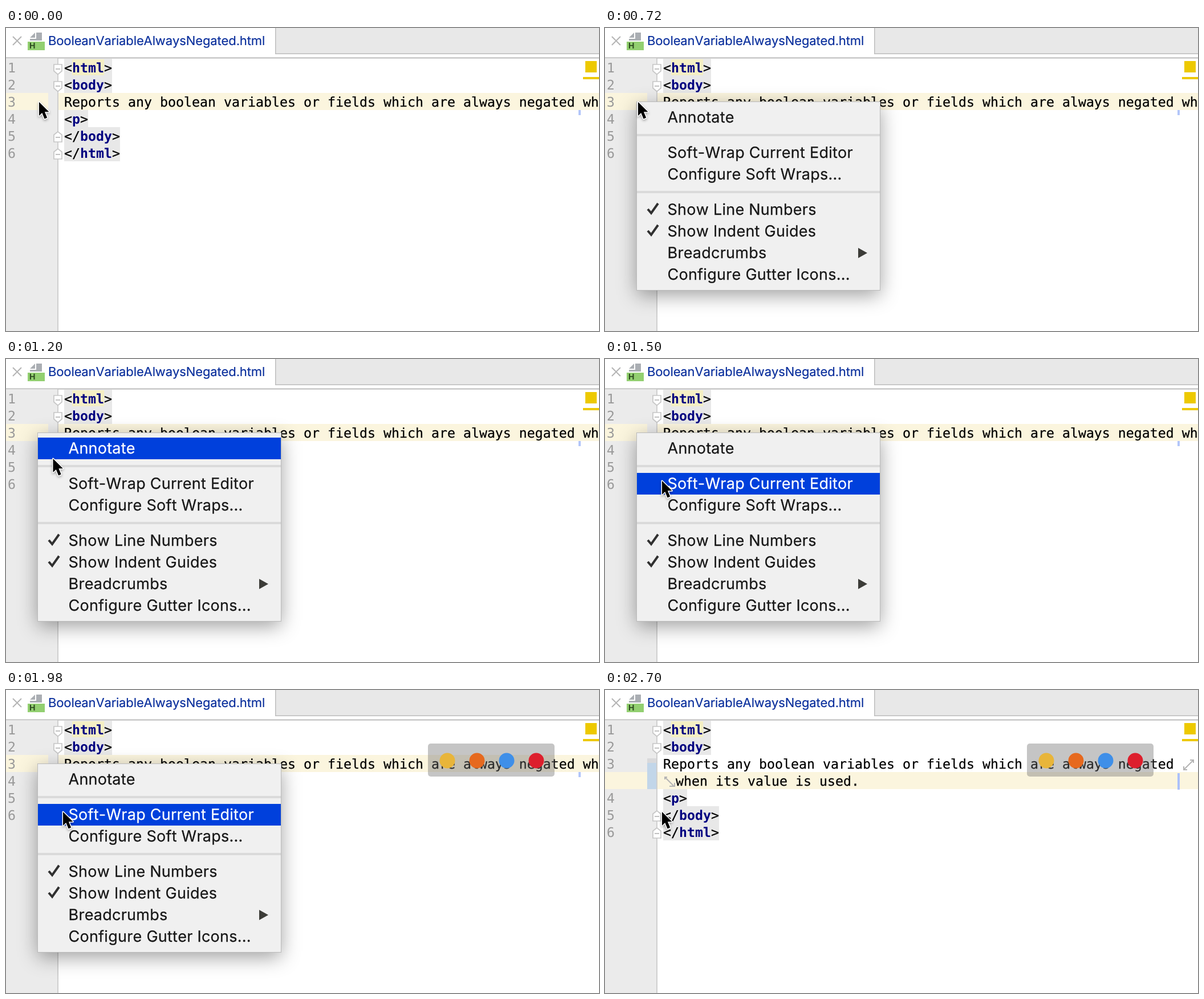
Write an HTML page that moves like this. It is 1040 px wide and 532 px high and loops after 2760 ms.

```html
<!DOCTYPE html>
<html lang="en">
<head>
<meta charset="utf-8">
<title>Soft wrap demo</title>
<style>
  html, body { margin: 0; width: 100%; height: 100%; overflow: hidden; background: #fff; }
  svg { display: block; width: 1040px; height: 532px; }
  text { white-space: pre; text-rendering: geometricPrecision; }
  .code { font: 23.25px "DejaVu Sans Mono", monospace; fill: #000; stroke: #000; stroke-width: .25; }
  .code .tag { font-weight: bold; fill: #000080; stroke: none; }
  .num { font: 23.25px "DejaVu Sans Mono", monospace; fill: #999; }
  .tab { font: 22px Inter, sans-serif; font-kerning: none; letter-spacing: -.12px;
    fill: #0a2f9c; stroke: #0a2f9c; stroke-width: .2; }
  .item { font: 27px Inter, sans-serif; font-kerning: none; letter-spacing: .25px;
    fill: #161616; stroke: #161616; stroke-width: .25; }
  .item.on { fill: #fff; stroke: #fff; }
  .line { fill: none; stroke: #b4b4b4; stroke-width: 2; }
  .shade { filter: drop-shadow(0 9px 17px rgba(0, 0, 0, .38)); }
  .arrow { filter: drop-shadow(0 2px 2px rgba(0, 0, 0, .3)); }
</style>
</head>
<body>
<svg id="stage" viewBox="0 0 1040 532"></svg>
<script>
const LOOP = 2760, STEP = 60;
const MENU_IN = 240, WRAP = 2040, POPUP_IN = 1560, POPUP_FADE = 240, CARET_OFF = 2520;
const GREY = '#e8e8e8', CREAM = '#fbf5de', GUTTER = '#ebebeb', YELLOW = '#edc900';
const CHAR = 14, LEFT = 102, ROW = 30, TOP = 54;

// time, x, y of the pointer tip
const PATH = [
  [0, 57, 129], [900, 57, 129], [960, 59, 131], [1020, 61.5, 134], [1140, 74, 157],
  [1260, 89, 191], [1380, 98, 210], [1440, 99, 213], [LOOP, 99, 213]
];

const rowY = row => TOP + row * ROW;
const rect = (x, y, w, h, fill, more = '') =>
  `<rect x="${x}" y="${y}" width="${w}" height="${h}" fill="${fill}" ${more}/>`;
const text = (cls, x, y, str) => `<text class="${cls}" x="${x}" y="${y}">${str}</text>`;
const path = (d, more = 'class="line"') => `<path d="${d}" ${more}/>`;
const group = (id, body) => `<g id="${id}">${body}</g>`;

const code = (row, str, x = LEFT) => text('code', x, rowY(row) + 24, str);
const num = (row, n) => text('num', 3, rowY(row) + 24, n);

function tag(row, name, open = '&lt;', lit = false) {
  const lead = open === '&lt;' ? 1 : 2;
  const width = (name.length + lead + 1) * CHAR;
  return rect(LEFT, rowY(row), width, ROW, GREY) +
    (lit ? rect(LEFT + lead * CHAR, rowY(row) + 1, name.length * CHAR, 28, '#f5efc4') : '') +
    code(row, `${open}<tspan class="tag">${name}</tspan>&gt;`);
}

function fold(row, up) {
  const y = rowY(row);
  const shape = up
    ? `M84 ${y + 26}V${y + 13.5}L91 ${y + 8}L98 ${y + 13.5}V${y + 26}Z`
    : `M84 ${y + 10}H98V${y + 21.5}L91 ${y + 27.5}L84 ${y + 21.5}Z`;
  return path(shape, 'fill="#fff" stroke="#c6c6c6" stroke-width="1.7"') +
    path(`M87 ${y + 18}H95`, 'stroke="#b8b8b8" stroke-width="1.7"');
}

const caretRow = row => rect(0, rowY(row), 74, ROW, CREAM) + rect(92, rowY(row), 948, ROW, CREAM);

const tail = row =>
  num(row, 4) + num(row + 1, 5) + num(row + 2, 6) +
  tag(row, 'p') + tag(row + 1, 'body', '&lt;/') + tag(row + 2, 'html', '&lt;/') +
  fold(row + 1, true) + fold(row + 2, true);

const SENTENCE = 'Reports any boolean variables or fields which are always negated';

const tabBar =
  rect(473, 0, 567, 45, GREY) + rect(472, 0, 1.5, 46, '#bdbdbd') +
  rect(472, 44.5, 568, 1.5, '#bdbdbd') + rect(0, 51.5, 1040, 2, '#bcbcbc') +
  path('M12 15L27 30M27 15L12 30', 'stroke="#b5b5b5" stroke-width="2"') +
  path('M42 17L51 8V17ZM53 8H63V22H42V19H53Z', 'fill="#aaaeb3"') +
  rect(38, 24, 30, 15, '#92cf70') +
  `<text x="41" y="36" font-family="Inter, sans-serif" font-size="14" font-weight="700" fill="#2c4a1f">H</text>` +
  text('tab', 74, 30, 'BooleanVariableAlwaysNegated.html');

const editor =
  rect(0, 53, 91, 479, GUTTER) + rect(90, 53, 2, 479, '#cfcfcf') +
  num(0, 1) + num(1, 2) + tag(0, 'html', '&lt;', true) + tag(1, 'body') +
  fold(0) + fold(1) +
  rect(1016, 58, 20, 20, YELLOW) + rect(1012, 86, 28, 4, YELLOW);

const flat =
  caretRow(2) + num(2, 3) + code(2, SENTENCE + ' when its') +
  rect(1004, 144, 4, 9, '#b3c6fa') + tail(3);

const wrapped =
  caretRow(3) + num(2, 3) + code(2, SENTENCE) + code(3, 'when its value is used.', 124) +
  rect(74, 120, 16, 8, '#d9d9db') + rect(74, 128, 16, 46, '#c2d6e9') +
  path('M105 157V153H109M106 154L120 168M113 169H122V163') +
  path('M1015 134V140H1021M1016 139L1031 124M1026 123H1032V128') +
  rect(1004, 146, 4, 29, '#abc0fa') + tail(4) +
  rect(446, 145, 3, 28, '#000', 'id="caret"');

const ITEMS = [
  ['Annotate', 138], ['Soft-Wrap Current Editor', 200], ['Configure Soft Wraps...', 238],
  ['Show Line Numbers', 300], ['Show Indent Guides', 338], ['Breadcrumbs', 376],
  ['Configure Gutter Icons...', 414]
];
const check = y => path(`M75 ${y + 18}L81 ${y + 25}L93 ${y + 8}`,
  'fill="none" stroke="#303030" stroke-width="4"');

const menu =
  rect(56, 130, 426, 330, '#f0f0f0', 'class="shade"') +
  rect(55.5, 129.5, 427, 331, '#f0f0f0', 'stroke="#bababa"') +
  rect(56, 186, 426, 4, '#dadada') + rect(56, 286, 426, 4, '#dadada') +
  rect(56, 0, 426, 38, '#0040dc', 'id="mark"') +
  ITEMS.map(([label, y]) => text('item', 109.5, y + 28, label)).join('') +
  check(300) + check(338) +
  path('M444 386L460 395L444 404Z', 'fill="#3c3c38"');

const popup =
  rect(740, 94, 222, 58, 'rgba(110,110,110,.4)', 'rx="5"') +
  ['#e8b53a', '#e6691e', '#3f8fe8', '#dd1f2d'].map((c, i) =>
    `<circle cx="${774 + i * 52}" cy="124" r="13.5" fill="${c}"/>`).join('');

const pointer = path('M0 0V24L5.3 19L9.6 29.5L14.2 27.5L9.9 17.2H17.4Z',
  'class="arrow" fill="#000" stroke="#fff" stroke-width="3" stroke-linejoin="round" paint-order="stroke"');

document.getElementById('stage').innerHTML = tabBar + editor +
  group('flat', flat) + group('wrapped', wrapped) +
  group('popup', popup) + group('menu', menu) + group('pointer', pointer);

const el = {};
for (const id of ['flat', 'wrapped', 'popup', 'menu', 'pointer', 'caret', 'mark'])
  el[id] = document.getElementById(id);
const labels = [...document.querySelectorAll('.item')];
const show = (node, on) => { node.style.display = on ? '' : 'none'; };

function tipAt(t) {
  const i = PATH.findIndex(p => p[0] > t);
  const [t0, x0, y0] = PATH[i - 1], [t1, x1, y1] = PATH[i];
  const k = (t - t0) / (t1 - t0);
  return [x0 + (x1 - x0) * k, y0 + (y1 - y0) * k];
}

function draw(t) {
  const [x, y] = tipAt(t);
  const hover = ITEMS.findIndex(([, top]) => y >= top && y < top + 38);
  show(el.flat, t < WRAP);
  show(el.wrapped, t >= WRAP);
  show(el.caret, t < CARET_OFF);
  show(el.menu, t >= MENU_IN && t < WRAP);
  show(el.mark, hover >= 0);
  if (hover >= 0) el.mark.setAttribute('y', ITEMS[hover][1]);
  labels.forEach((label, i) => label.classList.toggle('on', i === hover));
  el.popup.style.opacity = Math.min(1, Math.max(0, (t - POPUP_IN + STEP) / POPUP_FADE));
  el.pointer.setAttribute('transform', `translate(${x + 1} ${y + 1})`);
}

const start = performance.now();
function tick() {
  const t = (performance.now() - start) % LOOP;
  draw(Math.floor(t / STEP) * STEP);
  requestAnimationFrame(tick);
}
draw(0);
requestAnimationFrame(tick);
</script>
</body>
</html>
```
